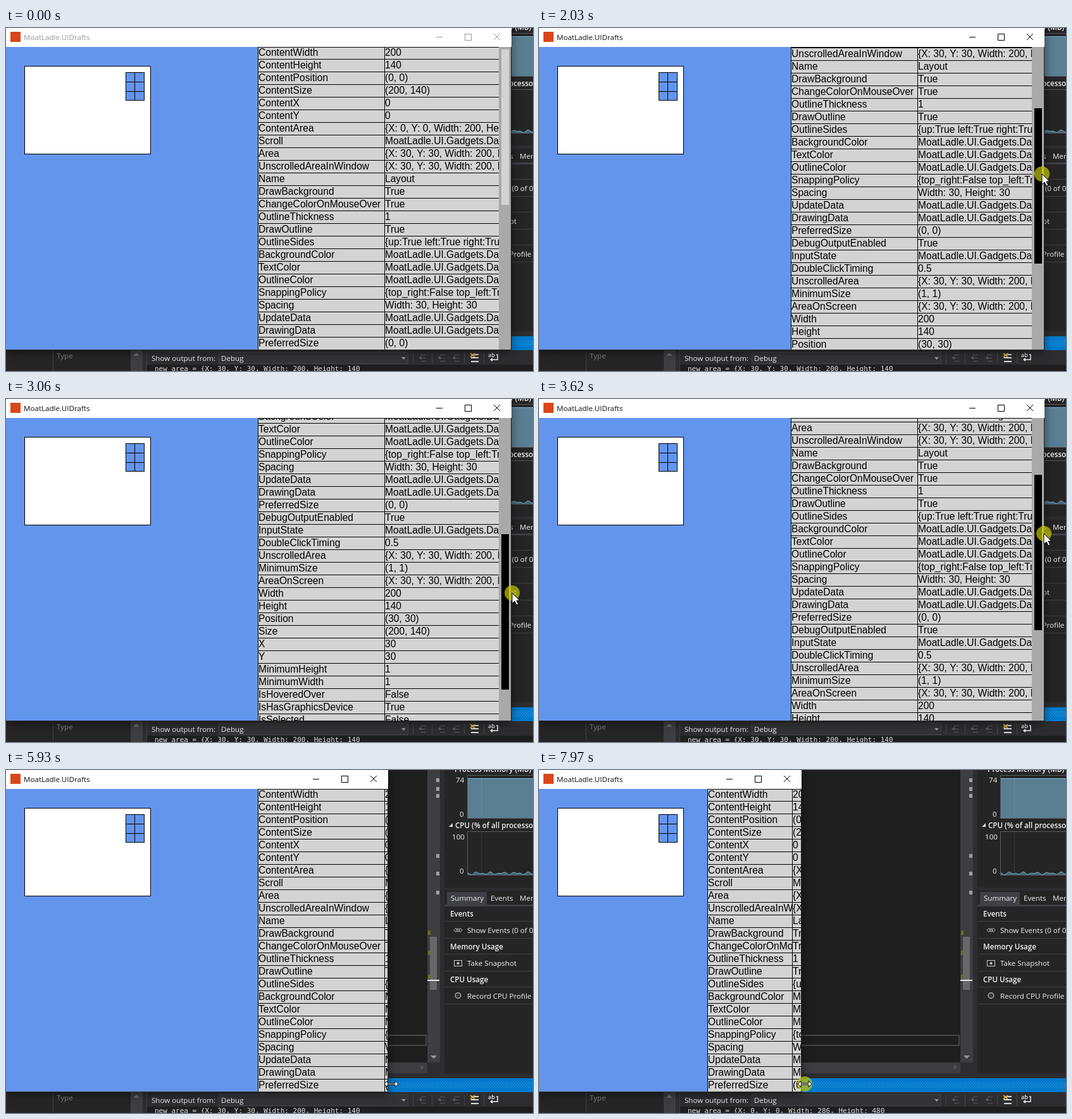
An HTML page with a canvas that plays this animation: 833x543 px, repeating every 8000 ms.

```html
<!DOCTYPE html>
<html lang="en">
<head>
<meta charset="utf-8">
<title>Property grid</title>
<style>
html, body { margin: 0; width: 100%; height: 100%; overflow: hidden; background: #1e1e1e; }
canvas { display: block; }
</style>
</head>
<body>
<canvas id="stage" width="833" height="543"></canvas>
<script>
const ctx = document.getElementById('stage').getContext('2d');
const LOOP = 8000;
const UI = '11.6px "Open Sans", sans-serif';
const UI_BOLD = '600 11.6px "Open Sans", sans-serif';
const GRID = '15.6px "Liberation Sans", Arial, sans-serif';
const MONO = '11px "DejaVu Sans Mono", monospace';
const BLUE = '#6495ed';

const TYPE = 'MoatLadle.UI.Gadgets.Data';
const AREA = '{X: 30, Y: 30, Width: 200, Height: 140}';
const ROWS = [
  ['ContentWidth', '200'], ['ContentHeight', '140'], ['ContentPosition', '(0, 0)'],
  ['ContentSize', '(200, 140)'], ['ContentX', '0'], ['ContentY', '0'],
  ['ContentArea', '{X: 0, Y: 0, Width: 200, Height: 140}'], ['Scroll', TYPE], ['Area', AREA],
  ['UnscrolledAreaInWindow', AREA], ['Name', 'Layout'], ['DrawBackground', 'True'],
  ['ChangeColorOnMouseOver', 'True'], ['OutlineThickness', '1'], ['DrawOutline', 'True'],
  ['OutlineSides', '{up:True left:True right:True down:True}'], ['BackgroundColor', TYPE],
  ['TextColor', TYPE], ['OutlineColor', TYPE],
  ['SnappingPolicy', '{top_right:False top_left:True}'], ['Spacing', 'Width: 30, Height: 30'],
  ['UpdateData', TYPE], ['DrawingData', TYPE], ['PreferredSize', '(0, 0)'],
  ['DebugOutputEnabled', 'True'], ['InputState', TYPE], ['DoubleClickTiming', '0.5'],
  ['UnscrolledArea', AREA], ['MinimumSize', '(1, 1)'], ['AreaOnScreen', AREA],
  ['Width', '200'], ['Height', '140'], ['Position', '(30, 30)'], ['Size', '(200, 140)'],
  ['X', '30'], ['Y', '30'], ['MinimumHeight', '1'], ['MinimumWidth', '1'],
  ['IsHoveredOver', 'False'], ['IsHasGraphicsDevice', 'True'], ['IsSelected', 'False'],
  ['IsOwned', 'True'], ['Parent', TYPE], ['Behaviors', TYPE], ['Actions', TYPE]
];

// Tracks: [time, value, ...]
const WINDOW_WIDTH = [[5210, 799], [5370, 775], [5610, 690], [5900, 604], [6270, 604], [6600, 571],
  [6900, 571], [7300, 534], [7500, 534], [7900, 415]];
const LAYOUT_WIDTH = [[0, 799], [6060, 604], [6760, 571], [7380, 534]];
const THUMB = [[1230, 0], [1550, 16], [2500, 170], [2800, 196], [3050, 182], [3615, 86], [4080, 0]];
const SCROLL = [[1230, 0], [1550, 43], [2500, 312], [2800, 358], [3050, 334], [3615, 153], [4080, 0]];
const POINTER = [[340, 850, 290], [850, 740, 150], [1150, 772, 138], [1230, 793, 144], [1550, 794, 160],
  [2500, 796, 302], [2800, 800, 325], [3050, 800, 309], [3615, 798, 213], [4110, 797, 127],
  [4405, 797, 431], [4650, 808, 508], [4900, 809, 514], [5130, 804, 497]];
const PRESSES = [[1220, 4110], [5200, 5900], [6270, 6640], [6900, 7330], [7490, 8000]];
const LOG = [[0, '30, Y: 30, Width: 200, Height: 140'], [6320, '0, Y: 0, Width: 303, Height: 480'],
  [6940, '0, Y: 0, Width: 286, Height: 480']];

const clamp01 = v => Math.min(1, Math.max(0, v));

function tween(track, t, i = 1) {
  const next = track.findIndex(k => k[0] > t);
  if (next === 0) return track[0][i];
  if (next < 0) return track[track.length - 1][i];
  const a = track[next - 1], b = track[next];
  return a[i] + (b[i] - a[i]) * (t - a[0]) / (b[0] - a[0]);
}
const held = (track, t) => track.filter(k => k[0] <= t).pop()[1];
const gray = v => `rgb(${v},${v},${v})`;

function rect(x, y, w, h, color) {
  ctx.fillStyle = color;
  ctx.fillRect(x, y, w, h);
}
function box(x, y, w, h, fill, line) {
  rect(x, y, w, h, line);
  rect(x + 1, y + 1, w - 2, h - 2, fill);
}
function text(s, x, y, font, color) {
  ctx.font = font;
  ctx.fillStyle = color;
  ctx.fillText(s, x, y);
}
function path(points, { fill, line, width = 1, close = !!fill }) {
  ctx.beginPath();
  for (let i = 0; i < points.length; i += 2) ctx.lineTo(points[i], points[i + 1]);
  if (close) ctx.closePath();
  if (fill) { ctx.fillStyle = fill; ctx.fill(); }
  if (line) { ctx.strokeStyle = line; ctx.lineWidth = width; ctx.stroke(); }
}
function disc(x, y, r, color) {
  ctx.fillStyle = color;
  ctx.beginPath();
  ctx.arc(x, y, r, 0, 7);
  ctx.fill();
}
function clipped(x, y, w, h, draw) {
  ctx.save();
  ctx.beginPath();
  ctx.rect(x, y, w, h);
  ctx.clip();
  draw();
  ctx.restore();
}

function drawEditor() {
  rect(0, 0, 833, 543, '#2d2d30');
  rect(0, 0, 666, 463, '#1e1e1e');
  rect(0, 419, 665, 18, '#464646');
  rect(0, 421, 663, 14, '#1e1e1e');
  rect(666, 0, 20, 463, '#3e3e42');
  rect(0, 463, 666, 17, '#3e3e42');
  rect(670, 264, 11, 84, '#686868');
  for (const y of [13, 27, 38, 133, 161, 191]) rect(680, y, 5, 6, '#a0a0a0');
  for (const y of [254, 286, 324]) rect(667, y, 4, 7, '#6b6b23');
  rect(666, 332, 19, 2, '#e8e8e8');
  path([671, 452, 681, 452, 676, 457], { fill: '#999' });
  path([656, 467, 660, 471, 656, 475], { fill: '#58585c' });
  rect(0, 488, 833, 22, '#007acc');
  for (let y = 0; y < 5; y++)
    for (let x = 430 + (y % 2) * 2; x < 833; x += 4) rect(x, 494 + y * 2, 1, 1, '#4fa3dc');
}

function drawDiagnostics() {
  rect(693, 0, 140, 480, '#252526');
  const white = '#f1f1f1';
  text('Process Memory (MB)', 709, 3, UI_BOLD, white);
  text('74', 711, 20, UI, white);
  text('0', 717, 74, UI, white);
  box(729, 8, 110, 69, '#252526', '#5a5a5e');
  rect(730, 14, 103, 62, '#5a7f92');
  rect(730, 13, 103, 1, '#7fb4d0');
  rect(751, 9, 1, 67, 'rgba(255,255,255,.08)');
  path([706, 84, 706, 90, 700, 90], { fill: '#ddd' });
  text('CPU (% of all processors)', 710, 92, UI_BOLD, white);
  text('100', 705, 110, UI, white);
  text('0', 717, 164, UI, white);
  box(729, 97, 110, 70, '#252526', '#5a5a5e');
  rect(751, 98, 1, 68, '#333337');
  const curve = [730, 166];
  for (let x = 730; x <= 833; x++)
    curve.push(x, 163.5 + 1.2 * Math.sin(x * .31) + Math.sin(x * .53 + 1));
  path([...curve, 833, 166], { fill: '#47687a' });
  path(curve.slice(2), { line: '#6fa5c0' });

  rect(693, 186, 140, 5, '#2d2d30');
  rect(697, 193, 63, 21, '#3f3f46');
  rect(693, 213, 140, 3, '#3f3f46');
  text('Summary', 703, 207, UI, white);
  text('Events', 766, 207, UI, white);
  text('Memory', 812, 207, UI, white);
  [['Events', 'Show Events (0 of 0)'], ['Memory Usage', 'Take Snapshot'],
   ['CPU Usage', 'Record CPU Profile']].forEach(([head, item], i) => {
    const y = 232 + i * 52;
    text(head, 702, y, UI_BOLD, white);
    rect(693, y + 7, 140, 1, '#3f3f46');
    rect(693, y + 34, 140, 1, '#3f3f46');
    text(item, 729, y + 26, UI, white);
  });
  for (const x of [711, 714.5, 718]) {
    path([x - 3, 253.5, x, 250.5, x + 3, 253.5, x, 256.5, x - 3, 253.5], { line: '#ccc' });
  }
  box(708, 301, 13, 10, '#252526', '#ccc');
  disc(714.5, 306, 2, '#ccc');
  disc(714.5, 357, 5, '#bbb');
  disc(714.5, 357, 3.8, '#3a3a3c');
}

function drawOutput(t) {
  rect(0, 510, 197, 33, '#252526');
  rect(74, 510, 1, 33, '#3f3f46');
  text('Type', 80, 523, UI, '#858585');
  rect(197, 510, 19, 33, '#3e3e42');
  path([201, 519, 211, 519, 206, 514], { fill: '#6a6a6e' });
  rect(222, 510, 1, 33, '#3f3f46');
  text('Show output from:', 230, 527, UI, '#f1f1f1');
  box(336, 513, 300, 19, '#333337', '#434346');
  text('Debug', 340, 527, UI, '#f1f1f1');
  path([625, 521, 632, 521, 628.5, 525], { fill: '#999' });
  for (const x of [643, 673, 724, 755]) rect(x, 514, 1, 17, '#46464a');
  for (const x of [652, 682, 705]) {
    rect(x + 4, 517, 8, 1, '#58585c');
    rect(x + 4, 527, 8, 1, '#58585c');
    path([x + 5, 519, x, 522, x + 5, 525], { fill: '#58585c' });
    rect(x + 4, 522, 7, 1, '#58585c');
  }
  for (const y of [516, 521, 527]) rect(735, y, 12, 2, '#ddd');
  path([734, 515, 741, 521], { line: '#d7a93c', width: 2 });
  path([741, 515, 734, 521], { line: '#d7a93c', width: 2 });
  text('ab', 762, 521, '600 9px "Open Sans", sans-serif', '#eee');
  path([775, 517, 777, 517, 777, 525, 768, 525], { line: '#eee', width: 1.5 });
  path([769, 522, 765, 525, 769, 528], { fill: '#eee' });
  rect(223, 533, 610, 10, '#1e1e1e');
  text('new area = {X: ' + held(LOG, t), 235, 543, MONO, '#dcdcdc');
}

function drawTitleBar(width, active) {
  rect(0, 0, width, 30, '#fff');
  rect(7, 6, 16, 16, '#d9471a');
  text('MoatLadle.UIDrafts', 28, 19, UI, active ? '#111' : '#999');
  const line = active ? '#000' : '#999';
  rect(width - 119, 14, 10, 1, line);
  box(width - 74, 9, 11, 11, '#fff', line);
  path([width - 28, 9, width - 18, 19], { line });
  path([width - 18, 9, width - 28, 19], { line });
}

function drawGrid(t) {
  const layout = held(LAYOUT_WIDTH, t);
  const left = Math.floor(layout / 2) - 1;
  const column = left + Math.floor((layout - left) / 2);
  const bar = layout - 20;
  const scroll = Math.round(tween(SCROLL, t));
  rect(left, 30, layout - left, 480, '#d3d3d3');
  clipped(left, 30, bar - left, 480, () => {
    ROWS.forEach(([name, value], i) => {
      const y = 30 + i * 20 - scroll;
      if (y < 8 || y > 510) return;
      if (name === 'ContentY' && t > 1000) {
        const glow = clamp01((t - 1000) / 150) * clamp01((1900 - t) / 550);
        rect(column, y, bar - column, 19, gray(Math.round(211 + 36 * glow)));
      }
      clipped(left, y, column - left, 20, () => text(name, left + 1, y + 14, GRID, '#000'));
      text(value, column + 1, y + 14, GRID, '#000');
      rect(left, y + 19, bar - left, 1, '#000');
    });
    rect(column, 30, 1, 480, '#000');
  });
  rect(left, 30, 1, 480, '#000');
  rect(left, 30, bar - left, 1, '#000');
  rect(bar, 30, 19, 480, '#a9a9a9');
  const dark = clamp01((t - 1100) / 350) * (1 - clamp01((t - 4190) / 600));
  rect(bar + 4, 34 + Math.round(tween(THUMB, t)), 12, 246, gray(Math.round(211 * (1 - dark))));
}

function drawWindow(t, width) {
  ctx.save();
  ctx.shadowColor = 'rgba(0,0,0,.5)';
  ctx.shadowBlur = 14;
  ctx.shadowOffsetY = 3;
  rect(0, 0, width, 510, '#222');
  ctx.restore();
  drawTitleBar(width, t > 1300);
  clipped(0, 30, width, 480, () => {
    rect(0, 30, width, 480, BLUE);
    box(29, 60, 200, 140, '#fff', '#000');
    rect(189, 70, 30, 45, '#000');
    for (let i = 0; i < 6; i++)
      rect(190 + (i % 2) * 14, 71 + Math.floor(i / 2) * 15, 14 - (i % 2 ? 0 : 1), i < 4 ? 14 : 13, BLUE);
    drawGrid(t);
    rect(0, 509, width, 1, '#333');
    rect(width - 1, 30, 1, 480, '#222');
  });
}

function drawPointer(t, width) {
  if (t < 340) return;
  const resizing = t > 5100;
  const x = Math.round(resizing ? width + 5 : tween(POINTER, t, 1));
  const y = Math.round(resizing ? 497 : tween(POINTER, t, 2));
  if (PRESSES.some(([from, to]) => t >= from && t < to)) disc(x, y, 12, 'rgba(205,205,0,.68)');
  const style = { fill: '#fff', line: '#000' };
  if (resizing) {
    path([x - 11, y, x - 6, y - 5, x - 6, y - 1, x + 6, y - 1, x + 6, y - 5, x + 11, y,
      x + 6, y + 5, x + 6, y + 1, x - 6, y + 1, x - 6, y + 5], style);
  } else {
    path([x, y, x, y + 17, x + 4, y + 13, x + 7, y + 19, x + 10, y + 18, x + 7, y + 12,
      x + 12, y + 12], style);
  }
}

function frame() {
  const now = performance.now() % LOOP;
  // The picture refreshes about every 79.4 ms after the opening pause.
  const t = Math.max(0, 360 + Math.floor((now - 355) / 79.4) * 79.4);
  const width = Math.round(tween(WINDOW_WIDTH, t));
  drawEditor();
  drawDiagnostics();
  drawOutput(t);
  drawWindow(t, width);
  drawPointer(t, width);
  requestAnimationFrame(frame);
}
frame();
</script>
</body>
</html>
```
